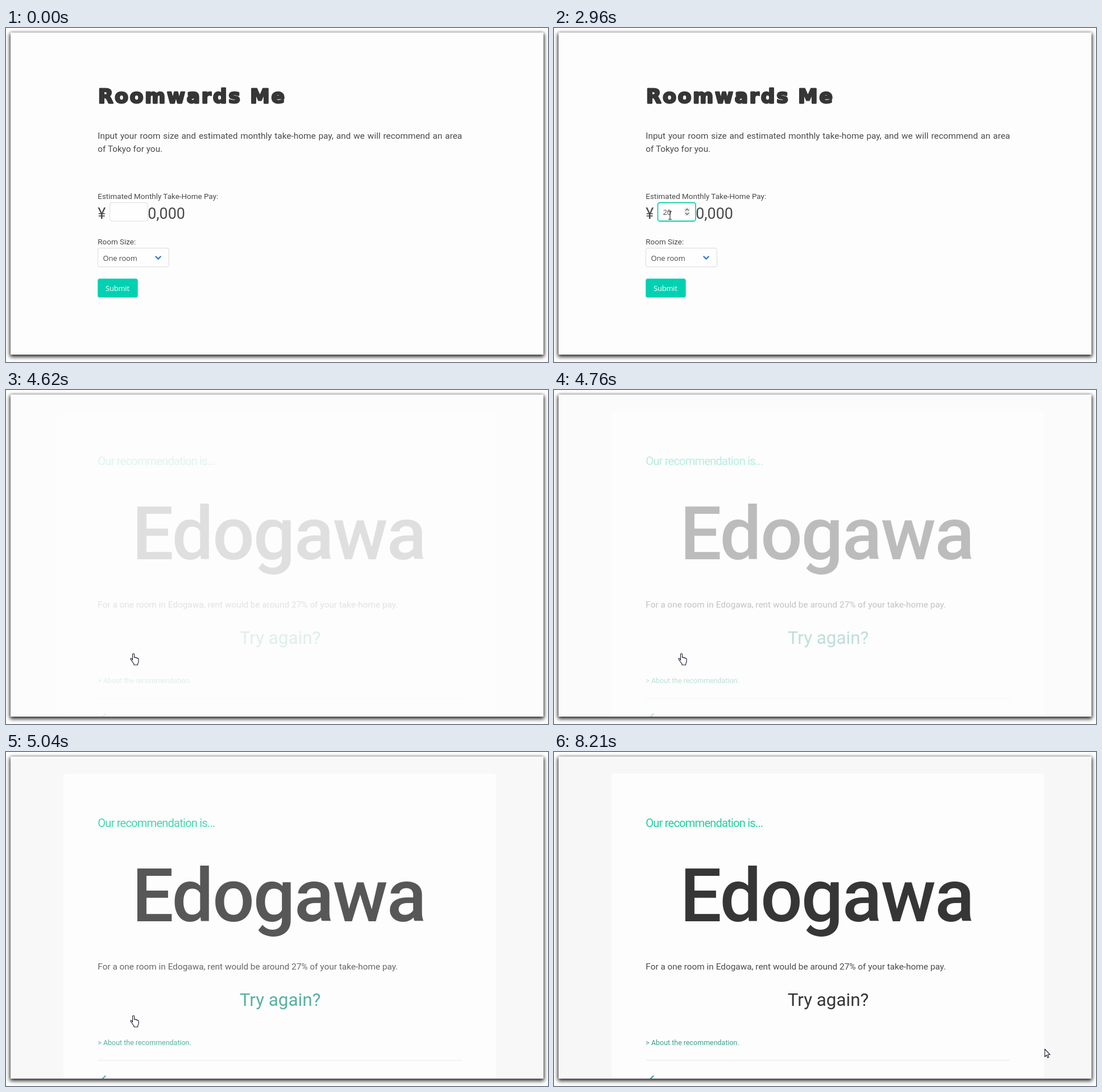
Animation of 953 by 588 pixels, one loop 8.28 s. Source, as an HTML page:

```html
<!DOCTYPE html>
<html lang="en">
<head>
<meta charset="utf-8">
<title>Area finder</title>
<style>
html, body { margin: 0; width: 100%; height: 100%; overflow: hidden; background: #fff; }
.window { position: absolute; left: 8px; top: 8px; width: 936.5px; height: 567px; background: #fdfdfd;
  box-shadow: 0 3px 7px 1px rgba(0,0,0,.75), 0 1px 6px rgba(0,0,0,.4); }
svg { position: absolute; left: 0; top: 0; width: 953px; height: 588px; }
text { font-family: Roboto, sans-serif; fill: #4a4a4a; white-space: pre; }
p { position: absolute; left: 161.3px; top: 179px; width: 640.7px; margin: 0;
  font: 15.36px/23.04px Roboto, sans-serif; color: #4a4a4a; text-align: justify; }
.logo { font: bold 34.5px "DejaVu Sans", sans-serif; letter-spacing: 2.8px; fill: #363636;
  stroke: #363636; stroke-width: 2.8px; stroke-linejoin: round; }
.label { font-size: 13.44px; }
.big { font-size: 26.88px; }
.control { font: 13px "Open Sans", sans-serif; letter-spacing: -.2px; }
.box { fill: #fefefe; stroke: #dbdbdb; }
.box.hover { stroke: #b5b5b5; }
.box.focus { stroke: #16d0ad; stroke-width: 1.8px; }
.line { fill: none; stroke-width: 2.2px; stroke-linecap: round; stroke-linejoin: round; }
.lead { font-size: 20.16px; letter-spacing: -.84px; fill: #22cda3; }
.area { font-size: 130px; font-weight: 500; letter-spacing: -2.1px; fill: #363636; }
.retry { font-size: 31.4px; text-anchor: middle; fill: #3aa191; }
.retry.hover { fill: #363636; }
.about { font-size: 12.48px; fill: #3aa191; }
.pointer path { fill: #fff; stroke: #1a1a2a; stroke-width: 1.1px; stroke-linejoin: round; }
.pointer .beam { fill: none; stroke: #222; }
</style>
</head>
<body>
<div class="window"></div>

<div id="form">
  <p>Input your room size and estimated monthly take-home pay, and we will recommend an area of Tokyo for you.</p>
  <svg>
    <text class="logo" x="162" y="131.5">Roomwards Me</text>
    <text class="label" x="161.3" y="300.6">Estimated Monthly Take-Home Pay:</text>
    <text class="big" x="161.3" y="336">¥</text>
    <rect id="pay" class="box" x="182.5" y="307.5" width="66.5" height="32.5" rx="3.5"/>
    <text id="digits" class="control" x="191.6" y="329.3"></text>
    <g id="spinner">
      <rect x="229" y="316" width="10" height="15" fill="#ececec"/>
      <path d="M231 321.5l3-3 3 3M231 325.5l3 3 3-3" fill="none" stroke="#606060" stroke-width="1.3"/>
    </g>
    <text class="big" x="249.2" y="336">0,000</text>
    <text class="label" x="161.3" y="381.2">Room Size:</text>
    <rect id="size" class="box" x="161.5" y="387.5" width="125" height="33" rx="3.5"/>
    <text class="control" x="170.6" y="409.6">One room</text>
    <path class="line" d="M263.3 402.3l4.3 4.3 4.3-4.3" stroke="#3273dc"/>
    <rect id="ring" x="159" y="439" width="75" height="38" rx="5" fill="#00d1b2" opacity=".25"/>
    <rect id="submit" x="161.3" y="441.2" width="70.4" height="33.3" rx="3.5" fill="#00d1b2"/>
    <text class="control" x="175" y="463" style="fill:#fff">Submit</text>
  </svg>
</div>

<svg id="result">
  <clipPath id="view"><rect x="8" y="8" width="936.5" height="567"/></clipPath>
  <g clip-path="url(#view)">
    <rect x="8" y="8" width="937" height="567" fill="#f7f7f7"/>
    <rect x="101" y="38" width="761" height="600" rx="6" fill="#fdfdfd"/>
    <text class="lead" x="161.3" y="132">Our recommendation is...</text>
    <text class="area" x="221.4" y="298">Edogawa</text>
    <text x="161.3" y="383" font-size="15.36">For a one room in Edogawa, rent would be around 27% of your take-home pay.</text>
    <text id="retry" class="retry" x="482" y="447">Try again?</text>
    <text class="about" x="161.3" y="515.6">&gt; About the recommendation.</text>
    <rect x="161.5" y="542" width="640.5" height="2.2" fill="#f2f2f2"/>
    <path class="line" d="M174.5 570.5l-6 6 6 6" stroke="#3aa191"/>
  </g>
</svg>

<svg class="pointer">
  <path id="arrow" d="M0 0V13.5L3 10.6 5 15.2 7 14.4 5.1 9.8H9.3Z"/>
  <path id="hand" d="M-1.5 11.5V1.5a1.5 1.5 0 0 1 3 0V7l1-.4q1.6-.3 1.8 1l1-.2q1.4-.1 1.6 1l.8-.1q1.4.1 1.4 1.5v4.2q0 2-1.5 4V20H1v-2q-2-2-3.2-4.2l-2.6-3.6q-.6-1.4.6-1.9 1.2-.2 2.7 3.2z"/>
  <path id="beam" class="beam" d="M-3-7h2.2L0-6.4.8-7H3M0-6.4V6.4M-3 7h2.2L0 6.4.8 7H3"/>
</svg>

<script>
const LOOP = 8280, STEP = 70;
const $ = id => document.getElementById(id);

// A run of values, one per screen update.
const run = (start, ...values) => values.map((value, i) => [start + i * STEP, value]);
// The last value set at or before t.
const at = (track, t) => track.reduce((last, [time, value]) => time <= t ? value : last, undefined);

const arrow = (x, y) => ['arrow', x, y];
const hand = (x, y) => ['hand', x, y];
const beam = (x, y) => ['beam', x, y];

const pointer = [
  [0, ['none', 0, 0]],
  ...run(800, arrow(603, 570), arrow(534, 457), arrow(464, 371), arrow(335, 303), arrow(198, 262),
    arrow(198, 275), beam(200, 312), beam(203, 325), beam(204, 329), beam(204, 330)),
  ...run(3050, beam(204, 332), beam(205, 337), arrow(205, 346), arrow(208, 358), arrow(215, 372),
    hand(224, 389), hand(230, 395), hand(234, 397), hand(235, 399)),
  ...run(3810, hand(232, 412), arrow(228, 427), hand(225, 452), hand(224, 464)),
  ...run(5580, hand(226, 463), arrow(255, 452), arrow(288, 437), arrow(350, 420), arrow(400, 418),
    hand(430, 428), hand(442, 436), hand(446, 440), hand(447, 440.5)),
  ...run(8140, arrow(625, 481), arrow(863, 523))
];
const digits = [[0, ''], [1900, '2'], [2430, '20']];
const formFade = [[0, 1], ...run(4270, .6, .25, 0)];
const resultFade = [[0, 0], ...run(4620, .145, .22, .32, .43, .56, .7, .83, .93, 1)];

function draw(t) {
  const [kind, x, y] = at(pointer, t);
  for (const id of ['arrow', 'hand', 'beam']) {
    $(id).style.display = id === kind ? '' : 'none';
    $(id).setAttribute('transform', `translate(${x} ${y})`);
  }
  const between = (from, to) => t >= from && t < to;
  const show = (id, on) => $(id).style.visibility = on ? '' : 'hidden';

  $('digits').textContent = at(digits, t);
  $('pay').classList.toggle('hover', between(1220, 1700));
  $('pay').classList.toggle('focus', between(1700, 4270));
  $('size').classList.toggle('hover', between(3400, 3880));
  $('retry').classList.toggle('hover', t >= 5930);
  show('spinner', t >= 1220);
  show('ring', t >= 4270);
  $('submit').setAttribute('fill', t >= 3950 ? '#00c4a7' : '#00d1b2');
  $('form').style.opacity = at(formFade, t);
  $('result').style.opacity = at(resultFade, t);
}

function tick() {
  draw(performance.now() % LOOP);
  requestAnimationFrame(tick);
}
tick();
</script>
</body>
</html>
```
